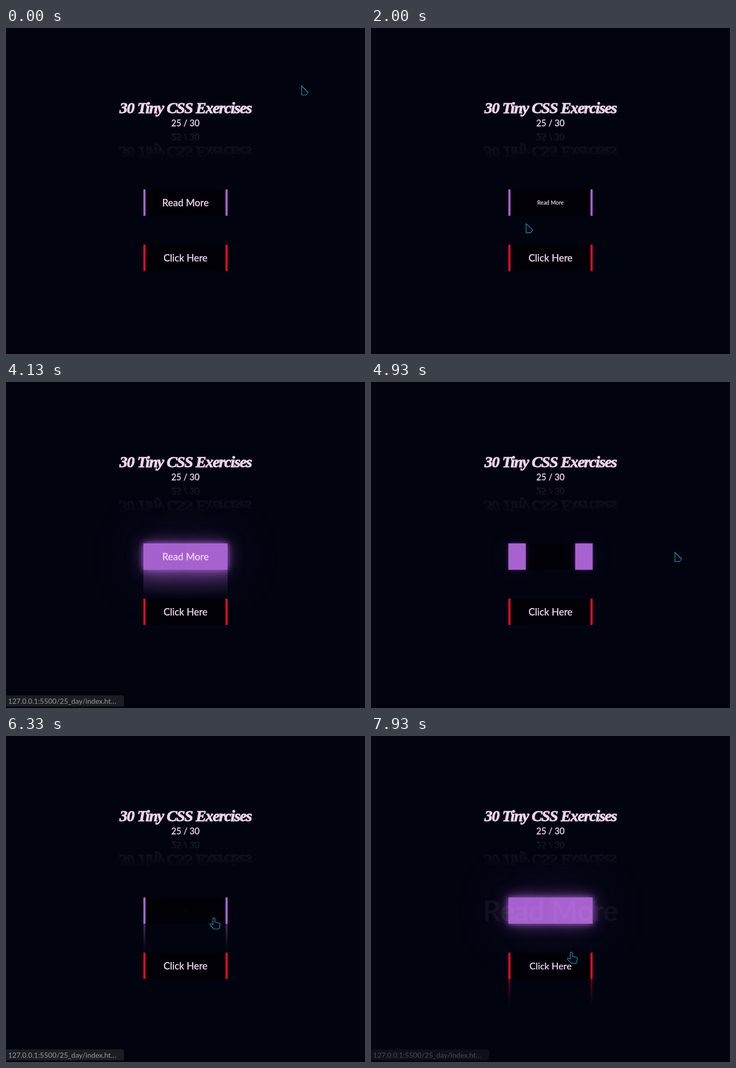
Write an HTML page that moves like this. It is 682x620 px and loops after 8000 ms.

```html
<!DOCTYPE html>
<html lang="en">
<head>
<meta charset="utf-8">
<title>Button hover effect</title>
<style>
html, body { margin: 0; width: 100%; height: 100%; overflow: hidden; background: #01040f; }
body { position: relative; font-family: Lato, sans-serif; font-weight: 500; color: #efd5f0; }
.head { position: absolute; left: 141px; top: 133px; width: 400px; height: 61px; text-align: center;
  white-space: nowrap; -webkit-box-reflect: below 0 linear-gradient(transparent, #0001 50%, #0002); }
.head h1 { margin: 0; font: italic bold 30px/38px "Liberation Serif", serif; letter-spacing: -1.4px;
  -webkit-text-stroke: 1px #efd3ee; color: #efd3ee; }
.head p { margin: 0; font-size: 16.4px; line-height: 20px; -webkit-text-stroke: .25px; }
.btn { position: absolute; left: 261px; width: 160px; height: 50px; background: #010007;
  font-size: 18.4px; line-height: 50px; text-align: center; white-space: nowrap; -webkit-text-stroke: .25px; }
.btn i { position: absolute; left: 0; top: 0; height: 50px; background: var(--c); }
.btn i + i { left: auto; right: 0; }
.btn.hover i::after { content: ""; position: absolute; left: 0; top: 100%; width: 100%; height: 50px;
  background: linear-gradient(var(--c), transparent); opacity: .38; }
.btn span { position: absolute; inset: 0; }
.floor { position: absolute; left: 0; top: 616px; width: 100%; height: 4px; background: #05000c; }
.status { position: absolute; left: 0; top: 596px; width: 220px; height: 21px; padding-left: 4px; overflow: hidden;
  background: #1b1d22; border-radius: 0 4px 0 0; color: #8d9098; font-size: 13.6px; line-height: 23px; white-space: nowrap; }
svg { position: absolute; left: 0; top: 0; overflow: visible; }
path { fill: #02060f; stroke: #2597c4; stroke-width: 1.2; stroke-linejoin: round; }
</style>
</head>
<body>
<div class="head"><h1>30 Tiny CSS Exercises</h1><p>25 / 30</p></div>
<div class="btn" id="read" style="top:307px;--c:#a762cf"><i></i><i></i><span>Read More</span><span>Read More</span></div>
<div class="btn" id="click" style="top:412px;--c:#e60a2b"><i></i><i></i><span>Click Here</span><span>Click Here</span></div>
<div class="floor"></div>
<div class="status">127.0.0.1:5500/25_day/index.ht…</div>
<svg width="24" height="24">
  <path id="arrow" d="M.5 0V17.5H9L13 12.5Z"/>
  <path id="hand" d="M-2 13V2Q-2 0 0 0T2 2V8L9 9.5Q12 10.5 11.5 13L10.5 19Q10 21 8 21H0L-7 14Q-8 11.5-6 11Z"/>
</svg>
<script>
const $ = s => document.querySelector(s);
const LOOP = 8000;

// Times at which the pointer alternately enters and leaves each button
const buttons = [
  { el: $('#read'), times: [1815, 1945, 2255, 4250, 5930, 7570] },
  { el: $('#click'), times: [7900] }
];

// Pointer stops: time, x, y
const stops = [
  [0, 561, 110], [670, 557, 110], [1430, 182, 306], [1600, 194, 316], [2000, 294, 372],
  [2255, 335, 357], [2700, 368, 347], [4130, 368, 347], [4800, 577, 324], [5750, 577, 324],
  [6200, 395, 346], [7270, 395, 346], [LOOP, 379, 418]
];

// CSS "ease": cubic-bezier(.25, .1, .25, 1)
function ease(x) {
  if (x <= 0 || x >= 1) return x <= 0 ? 0 : 1;
  const bez = (a, b, u) => 3 * a * u * (1 - u) ** 2 + 3 * b * u * u * (1 - u) + u ** 3;
  let lo = 0, hi = 1;
  for (let n = 0; n < 20; n++) {
    const mid = (lo + hi) / 2;
    if (bez(.25, .25, mid) < x) lo = mid; else hi = mid;
  }
  return bez(.1, 1, lo);
}

// 0 at rest, 1 when hovered: a transition with its own delay each way, held when interrupted
function transition(times, t, delayIn, delayOut, dur = 500) {
  let value = 0;
  times.forEach((time, n) => {
    const entering = n % 2 === 0;
    const elapsed = Math.min(t, times[n + 1] ?? LOOP) - time - (entering ? delayIn : delayOut);
    value += ((entering ? 1 : 0) - value) * ease(elapsed / dur);
  });
  return value;
}

const hovered = (times, t) => times.filter(time => time <= t).length % 2 === 1;

function pointer(t) {
  const n = stops.findIndex(s => s[0] > t);
  const [a, x, y] = stops[n - 1], [b, x2, y2] = stops[n];
  const k = (t - a) / (b - a);
  return [x + (x2 - x) * k, y + (y2 - y) * k];
}

function glow(p) {
  if (p < .01) return 'none';
  return [[10, .9], [30, .6], [110, .3]]
    .map(([blur, a]) => `0 0 ${blur * p}px rgb(167 98 207 / ${a * p})`).join();
}

function drawButton({ el, times }, t) {
  const [left, right, label, big] = el.children;
  const bars = transition(times, t, 500, 500);
  const shown = transition(times, t, 500, 0);
  for (const bar of [left, right]) {
    bar.style.width = 4 + 76 * bars + 'px';
    bar.style.boxShadow = glow(bars);
  }
  label.style.transform = `scale(${1 - transition(times, t, 0, 800)})`;
  big.style.transform = `scale(${3 - 2 * shown})`;
  big.style.opacity = shown;
  el.classList.toggle('hover', hovered(times, t));
}

function draw(now) {
  const t = now % LOOP;
  buttons.forEach(b => drawButton(b, t));
  const over = buttons.some(b => hovered(b.times, t));
  const [x, y] = pointer(t);
  $('svg').style.transform = `translate(${x}px, ${y}px)`;
  // The pointer blinks out briefly as it leaves its long rest
  $('svg').style.display = t >= 4125 && t < 4195 ? 'none' : '';
  $('#hand').style.display = over ? '' : 'none';
  $('#arrow').style.display = over ? 'none' : '';
  $('.status').style.opacity = transition(buttons[0].times, t, 205, 300, 200);
  requestAnimationFrame(draw);
}
requestAnimationFrame(draw);
</script>
</body>
</html>
```
